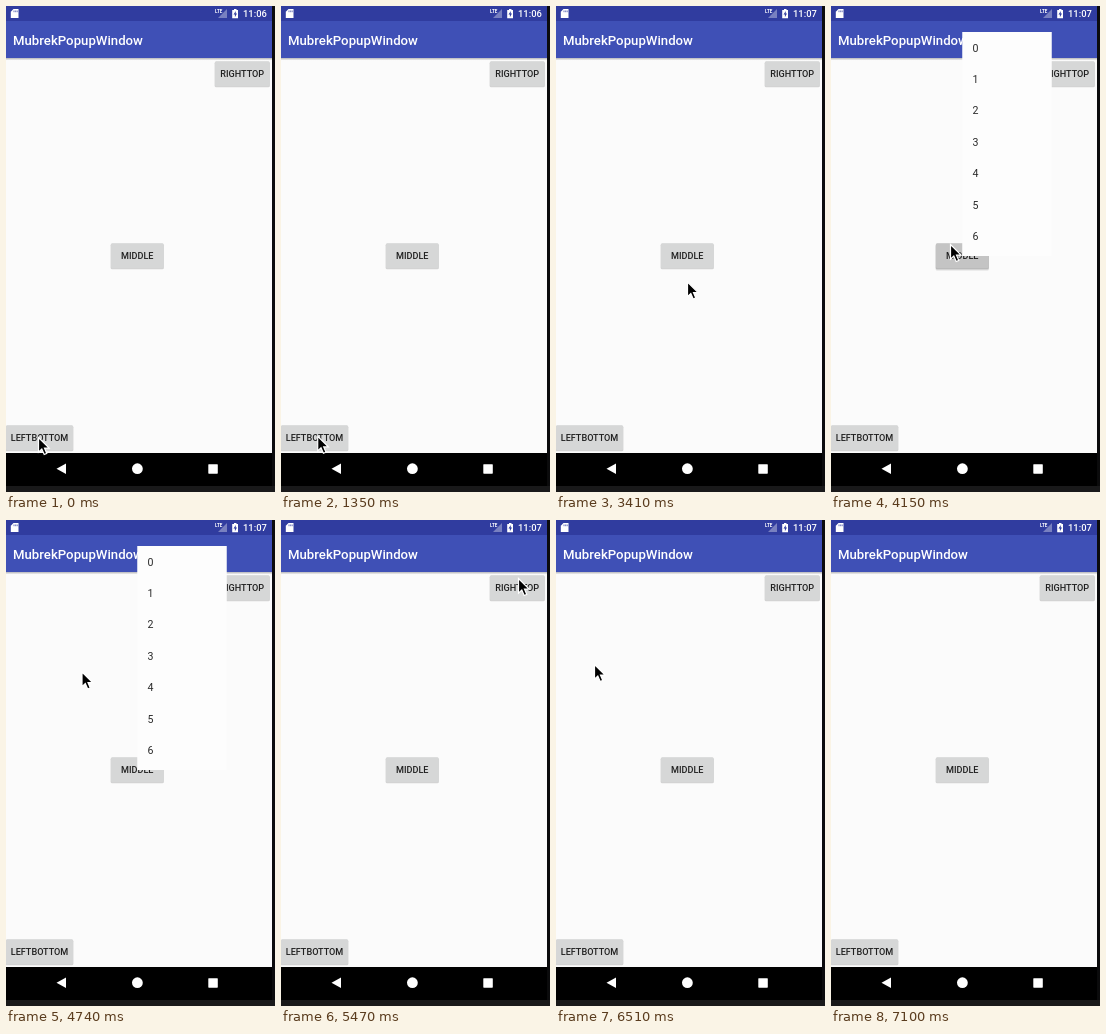
An HTML page that plays this animation: 269x486 px, repeating every 7550 ms.

```html
<!DOCTYPE html>
<html lang="en">
<head>
<meta charset="utf-8">
<title>Popup window demo</title>
<style>
  html, body { margin: 0; width: 100%; height: 100%; overflow: hidden; background: #000; }
  svg { display: block; width: 269px; height: 486px; font-family: Roboto, sans-serif; }
  .button text { font-size: 9.1px; font-weight: 500; text-anchor: middle; fill: #212121; }
  .popup text { font-size: 10.6px; text-anchor: middle; fill: #2a2a2a; }
</style>
</head>
<body>
<svg id="stage" viewBox="0 0 269 486">
  <defs>
    <linearGradient id="shade" x2="0" y2="1">
      <stop stop-color="#a8a8ac"/>
      <stop offset="1" stop-color="#fafafa"/>
    </linearGradient>
  </defs>
  <rect width="269" height="486" fill="#0b0b0c"/>
  <rect y="480" width="269" height="6" fill="#19191a"/>
  <rect width="266" height="447" fill="#fbfbfb"/>
  <rect y="51.5" width="266" height="3" fill="url(#shade)"/>
  <rect width="266" height="52" fill="#3f50b6"/>
  <rect width="266" height="15" fill="#303c9f"/>
  <rect y="447" width="266" height="33"/>

  <g fill="#fff">
    <path d="M7.5 3H12.5V12H4.8V5.7Z"/>
    <path d="M8 4.5v1.7M9.7 4.5v1.7M11.2 4.5v1.7" stroke="#303c9f" stroke-width=".7"/>
    <path d="M221 3V12H212Z" opacity=".35"/>
    <text x="209" y="7" font-size="4.6" font-weight="700">LTE</text>
    <path d="M228 3h2.5v1H232v8.2h-5.8V4H228Z"/>
    <path d="M229.8 5L227.5 8.6h1.4V11.2L231 7.6h-1.3Z" fill="#303c9f"/>
    <text id="clock" x="237" y="11.3" font-size="9.4" font-weight="500"></text>
    <text x="7" y="38.6" font-size="13.2" font-weight="500">MubrekPopupWindow</text>
    <path d="M50.5 462.7L60 457.5V468Z"/>
    <circle cx="131.4" cy="462.7" r="5.4"/>
    <rect x="202.3" y="458.2" width="9.5" height="9.5" rx=".6"/>
  </g>
</svg>
<script>
const stage = document.getElementById('stage');
const clock = document.getElementById('clock');
const LOOP = 7550, LEAD = 1042, STEP = 147.5;
const BUTTON_H = 25, POPUP_W = 89.5, POPUP_H = 224, ROW = 31.4;

function add(parent, tag, attrs, text = '') {
  const node = document.createElementNS('http://www.w3.org/2000/svg', tag);
  for (const key in attrs) node.setAttribute(key, attrs[key]);
  node.textContent = text;
  return parent.appendChild(node);
}

function makeButton({ label, x, y, w }) {
  const g = add(stage, 'g', { class: 'button' });
  const shadow = (dy, opacity) => add(g, 'rect',
    { x: x - .4, y: y + dy, width: w + .8, height: BUTTON_H + .5, rx: 1.5, opacity });
  const lift = shadow(2, .12);
  shadow(.8, .16);
  const face = add(g, 'rect', { x, y: y + .3, width: w, height: BUTTON_H - .3, rx: 1.2 });
  add(g, 'text', { x: x + w / 2, y: y + 15.8 }, label);
  return { lift, face };
}

// A popup hangs by one corner from the centre of its button
function makePopup({ x, y, w, corner }) {
  const left = x + w / 2 - (corner === 'right' ? POPUP_W : 0);
  const top = y + BUTTON_H / 2 + .5 - (corner === 'right' ? 0 : POPUP_H);
  const g = add(stage, 'g', { class: 'popup' });
  add(g, 'rect', { x: left, y: top, width: POPUP_W, height: POPUP_H, fill: '#fdfdfd' });
  for (let i = 0; i < 7; i++) add(g, 'text', { x: left + 13.2, y: top + 19.6 + i * ROW }, i);
  return g;
}

const menus = [
  { label: 'LEFTBOTTOM', x: 0, y: 419, w: 67, corner: 'left', tap: 8 },
  { label: 'MIDDLE', x: 105, y: 237, w: 52.5, corner: 'left', tap: 20 },
  { label: 'RIGHTTOP', x: 209, y: 55, w: 54.5, corner: 'right', tap: 31 }
];
for (const m of menus) m.button = makeButton(m);
for (const m of menus) m.popup = makePopup(m);

const cursor = add(stage, 'path', {
  d: 'M0 0V14.6L3.3 11.5L5.7 17L8.3 15.9L6 10.6H10.6Z', stroke: '#fff', 'stroke-width': 1.2
});

// Pointer moves: first step, number of steps, end point
const home = { x: 32.5, y: 431.5 };
const moves = [
  { from: -1, steps: 5, x: 39.5, y: 429.5 },
  { from: 10, steps: 3, x: 145, y: 392 },
  { from: 13, steps: 3, x: 131.5, y: 276 },
  { from: 16, steps: 2, x: 119.5, y: 238.5 },
  { from: 22, steps: 3, x: 76, y: 152 },
  { from: 25, steps: 5, x: 237.5, y: 58.5 },
  { from: 32, steps: 2, x: 38.5, y: 144.5 },
  { from: 38, steps: 3, x: 270, y: 530 }
];

function pointerAt(step) {
  return moves.reduce((p, m) => {
    const u = Math.min(1, Math.max(0, (step - m.from) / m.steps));
    return { x: p.x + (m.x - p.x) * u, y: p.y + (m.y - p.y) * u };
  }, home);
}

const show = (node, on) => { node.style.display = on ? '' : 'none'; };

function draw(t) {
  const step = Math.max(-1, Math.floor((t - LEAD) / STEP));
  clock.textContent = step < 13 ? '11:06' : '11:07';
  for (const { tap, button, popup } of menus) {
    const age = step - tap;
    show(button.lift, age >= 0 && age < 3);
    show(popup, age >= 1 && age < 6);
    button.face.setAttribute('fill', age >= 1 && age < 3 ? '#c4c4c4' : '#d6d7d7');
  }
  const { x, y } = pointerAt(step);
  cursor.setAttribute('transform', `translate(${x} ${y})`);
  show(cursor, step < 41);
}

const start = performance.now();
function tick() {
  draw((performance.now() - start) % LOOP);
  requestAnimationFrame(tick);
}
tick();
</script>
</body>
</html>
```
